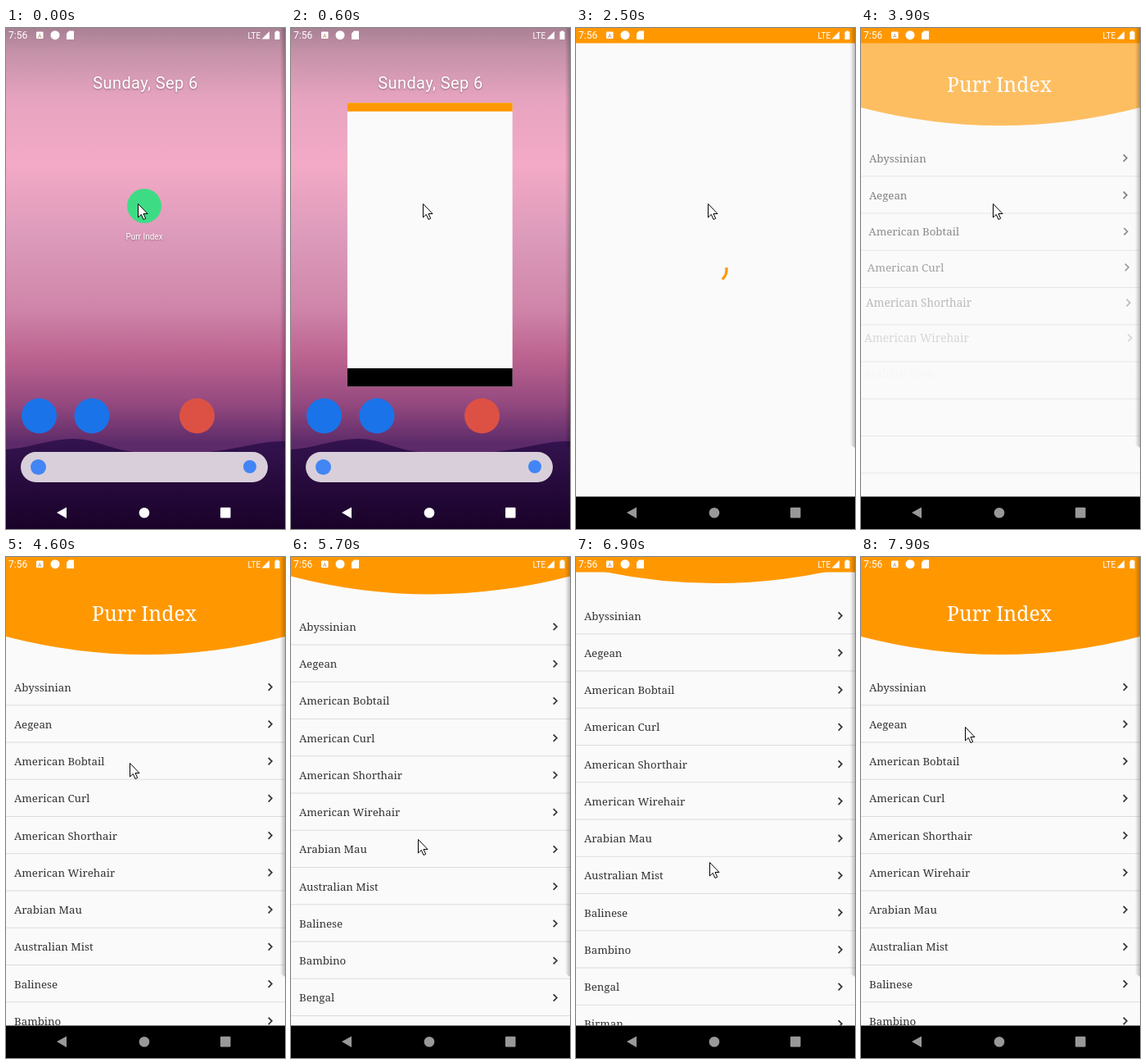
Write an HTML page that moves like this. It is 341 by 611 pixels and loops after 8000 ms.

```html
<!DOCTYPE html>
<html lang="en">
<head>
<meta charset="utf-8">
<title>Breed list</title>
<style>
  html, body { margin: 0; width: 100%; height: 100%; overflow: hidden; background: #000; }
  svg { display: block; width: 100%; height: 100%; }
  .sans { font-family: Roboto, sans-serif; fill: #fff; }
  .serif { font-family: "Noto Serif", serif; }
  .row text { font-size: 13.26px; fill: #333; }
  .row path { fill: none; stroke: #333; stroke-width: 1.7; }
  .shade { filter: drop-shadow(0 1px 1px #0005); }
</style>
</head>
<body>
<svg viewBox="0 0 341 611" preserveAspectRatio="none">
  <defs>
    <linearGradient id="sky" x2="0" y2="1">
      <stop offset="0" stop-color="#a98094"/>
      <stop offset=".05" stop-color="#c592a9"/>
      <stop offset=".14" stop-color="#e6a3bf"/>
      <stop offset=".27" stop-color="#f3aac6"/>
      <stop offset=".42" stop-color="#dc9aba"/>
      <stop offset=".56" stop-color="#cf85a9"/>
      <stop offset=".66" stop-color="#bb628f"/>
      <stop offset=".75" stop-color="#94497f"/>
      <stop offset=".83" stop-color="#5c2a69"/>
    </linearGradient>
    <linearGradient id="hill" x2="0" y2="1">
      <stop offset="0" stop-color="#34134f"/>
      <stop offset="1" stop-color="#190229"/>
    </linearGradient>
    <linearGradient id="edge">
      <stop offset="0" stop-color="#000" stop-opacity="0"/>
      <stop offset="1" stop-color="#000" stop-opacity=".24"/>
    </linearGradient>
    <clipPath id="view"><path d="M0 18H341V571.5H0Z"/></clipPath>
  </defs>

  <g id="home">
    <path fill="url(#sky)" d="M0 0H341V611H0Z"/>
    <path fill="url(#hill)" d="M0 514C30 512 50 502 80 501S125 515 165 518S240 519 270 514S320 503 341 504V611H0Z"/>
    <g class="sans shade" text-anchor="middle">
      <text x="170.500" y="73.500" font-size="20" letter-spacing=".4">Sunday, Sep 6</text>
      <text x="169" y="258" font-size="10">Purr Index</text>
    </g>
    <circle cx="169" cy="217" r="21" fill="#3ddc84"/>
    <circle cx="40.500" cy="473" r="21.500" fill="#1a73e8"/>
    <circle cx="105" cy="473" r="21.500" fill="#1a73e8"/>
    <circle cx="233.500" cy="473" r="21.500" fill="#dd5144"/>
    <rect x="18" y="517" width="302" height="37" rx="18.500" fill="#d8cfda"/>
    <circle cx="39.500" cy="535.500" r="9.500" fill="#4285f4"/>
    <circle cx="298" cy="535" r="8" fill="#4285f4"/>
  </g>

  <g id="app">
    <path fill="#fafafa" d="M0 0H341V611H0Z"/>
    <circle id="spinner" cx="169" cy="295" r="15" fill="none" stroke="#ff9800" stroke-width="3.300" pathLength="1"/>
    <g clip-path="url(#view)">
      <g id="page">
        <path fill="#ff9800" d="M0 0H341V97Q170.500 141 0 97Z"/>
        <text class="serif" x="169" y="78" font-size="24.700" fill="#fff" text-anchor="middle">Purr Index</text>
        <g id="list"></g>
      </g>
    </g>
    <path fill="#ff9800" d="M0 0H341V18.500H0Z"/>
    <path d="M0 571.500H341V611H0Z"/>
  </g>

  <path fill="url(#edge)" d="M335 0H341V512L335 508Z"/>

  <g class="sans">
    <text x="3" y="13.300" font-size="12">7:56</text>
    <rect x="37" y="4.500" width="8.500" height="8.500" rx="1"/>
    <text x="41.250" y="11.500" font-size="7" text-anchor="middle" style="fill:#b98a6a">A</text>
    <circle cx="60" cy="8.700" r="5.500"/>
    <path d="M77 3.500H83V14H74V6.500Z"/>
    <text x="295.500" y="12.800" font-size="10">LTE</text>
    <path d="M312.500 13.500 322 4V13.500Z"/>
    <path d="M330 3.500H333V4.500H334.500V14H328.500V4.500H330Z"/>
  </g>
  <g id="nav">
    <path d="M62 591 74 584.500V598Z"/>
    <circle cx="169" cy="591.300" r="6.300"/>
    <rect x="262" y="584.800" width="12.500" height="12.700" rx="1"/>
  </g>
  <path id="cursor" fill="#fff" stroke="#000" stroke-linejoin="round" d="M.5.5V17L4.300 13.400 7 19.500 9.700 18.300 7 12.500H12Z"/>
</svg>

<script>
const LOOP = 8000, TICK = 100, ROW = 45.25;
const breeds = ["Abyssinian", "Aegean", "American Bobtail", "American Curl",
  "American Shorthair", "American Wirehair", "Arabian Mau", "Australian Mist",
  "Balinese", "Bambino", "Bengal", "Birman", "Bombay", "British Longhair",
  "British Shorthair", "Burmese", "Burmilla"];

// [time, value, ...] tracks, linear between points
const cursorTrack = [
  [0, 161, 214], [4200, 161, 214], [4400, 158, 222], [4600, 151, 251],
  [4800, 147, 350], [5000, 149, 432], [5400, 149, 432], [5700, 155, 344],
  [6000, 178, 240], [6300, 214, 162], [6400, 219, 156], [6600, 203, 205],
  [6900, 163, 372], [7100, 139, 467], [7200, 134, 485], [7300, 134, 490],
  [7600, 134, 490], [7700, 128, 430], [7800, 123, 280], [7900, 127, 207]];
const scrollTrack = [
  [5400, 0], [5500, 16], [5700, 73.6], [6000, 184], [6300, 280], [6400, 288.8],
  [6600, 254], [6900, 87], [7100, 8], [7200, 0]];

const $ = id => document.getElementById(id);
const clamp = x => Math.min(1, Math.max(0, x));
const mix = (a, b, p) => a + (b - a) * p;

function sample(track, t) {
  const next = track.findIndex(point => point[0] > t);
  if (next === 0) return track[0].slice(1);
  if (next < 0) return track[track.length - 1].slice(1);
  const a = track[next - 1], b = track[next], p = (t - a[0]) / (b[0] - a[0]);
  return a.slice(1).map((v, i) => mix(v, b[i + 1], p));
}

// cubic-bezier(.4, 0, .2, 1)
function fastOutSlowIn(x) {
  let lo = 0, hi = 1;
  for (let i = 0; i < 16; i++) {
    const s = (lo + hi) / 2, r = 1 - s;
    if (1.2 * r * r * s + .6 * r * s * s + s ** 3 < x) lo = s; else hi = s;
  }
  return lo * lo * (3 - 2 * lo);
}

$("list").innerHTML = breeds.map((name, i) => `
  <g class="row serif"><text x="10" y="${163.5 + ROW * i}">${name}</text>
  <path d="M320.700 ${154.4 + ROW * i}l4.200 4.200-4.200 4.200"/></g>
  <path fill="#dcdcdc" d="M0 ${180.2 + ROW * i}h341v1h-341z"/>`).join("");
const rows = [...document.querySelectorAll(".row")];

function drawOpening(t) {
  const p = 1 - (1 - clamp((t - 450) / 550)) ** 2.4;
  const x = mix(148, 0, p), y = mix(196, 0, p);
  const sx = mix(42, 341, p) / 341, sy = mix(42, 611, p) / 611;
  $("app").setAttribute("transform", `translate(${x} ${y}) scale(${sx} ${sy})`);
  $("app").setAttribute("opacity", clamp(p * 2));
}

function drawSpinner(t) {
  const age = t - 1500, spinner = $("spinner");
  spinner.style.display = age > 0 && t < 3400 ? "" : "none";
  const phase = (age / 1333 % 1 + 1) % 1;
  const head = fastOutSlowIn(clamp(phase * 2));
  const tail = fastOutSlowIn(clamp(phase * 2 - 1));
  const turn = tail * .75 + age / 2222 + phase * .25 - .25;
  spinner.setAttribute("stroke-dasharray", `${Math.max(.002, (head - tail) * .75)} 1`);
  spinner.setAttribute("transform", `rotate(${turn * 360} 169 295)`);
}

function drawPage(t) {
  const [scroll] = sample(scrollTrack, t);
  $("page").setAttribute("opacity", clamp((t - 3350) / 900));
  $("page").setAttribute("transform", `translate(0 ${-scroll})`);
  rows.forEach((row, i) => {
    const u = clamp((t - 3600 - i * 49) / 240);
    const p = 1 - (1 - u) ** 1.3, rest = 1 - p, cy = 158.6 + ROW * i;
    row.setAttribute("opacity", p);
    row.setAttribute("transform",
      `translate(170 ${cy - 9.5 * rest}) scale(${1 + .052 * rest}) translate(-170 ${-cy})`);
  });
}

function frame(now) {
  const t = Math.floor(now % LOOP / TICK) * TICK;
  drawOpening(t);
  drawSpinner(t);
  drawPage(t);
  $("nav").setAttribute("fill", t < 1600 ? "#fff" : "#999");
  $("cursor").setAttribute("transform", `translate(${sample(cursorTrack, t)})`);
  requestAnimationFrame(frame);
}
frame(performance.now());
</script>
</body>
</html>
```
